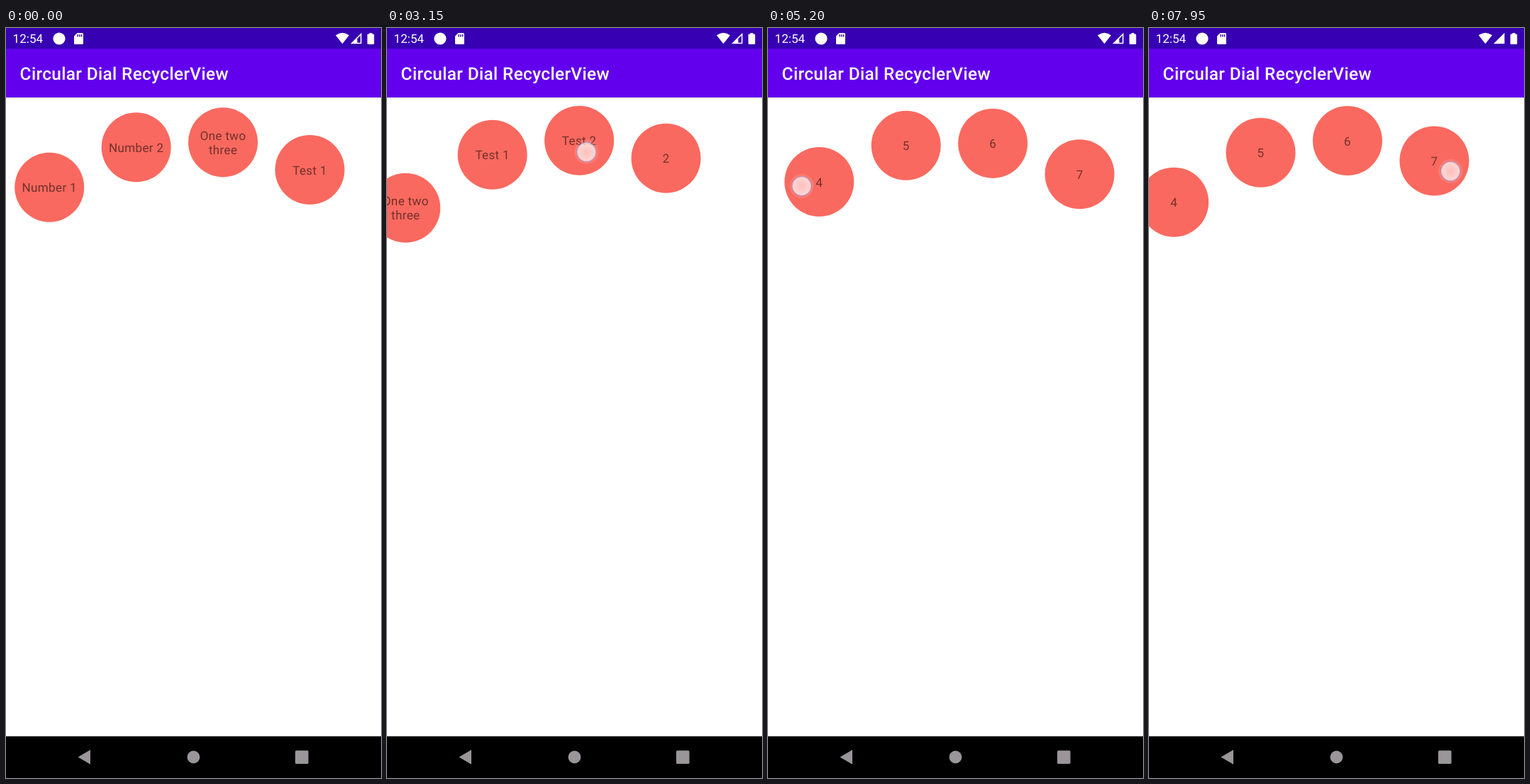
An HTML page that plays this animation: 529x1058 px, repeating every 8 s.

```html
<!DOCTYPE html>
<html lang="en">
<head>
<meta charset="utf-8">
<title>Circular dial list</title>
<style>
  html, body { margin: 0; width: 100%; height: 100%; overflow: hidden; background: #fff; }
  svg { display: block; width: 100vw; height: 100vh; }
  text { font-family: Roboto, sans-serif; fill: #fff; text-rendering: geometricPrecision; }
  .clock { font-size: 17.14px; }
  .title { font-size: 24.49px; font-weight: 500; letter-spacing: .0125em; }
  .item circle { fill: #fa695f; }
  .item text { font-size: 17.14px; letter-spacing: .0178em; text-anchor: middle; fill: #000; fill-opacity: .54; }
</style>
</head>
<body>
<svg viewBox="0 0 529 1058">
  <defs>
    <linearGradient id="shade" x2="0" y2="1">
      <stop offset="0" stop-color="#000" stop-opacity=".12"/>
      <stop offset="1" stop-color="#000" stop-opacity="0"/>
    </linearGradient>
    <radialGradient id="glass">
      <stop offset="0" stop-color="#fff" stop-opacity=".52"/>
      <stop offset="1" stop-color="#fff" stop-opacity=".7"/>
    </radialGradient>
  </defs>

  <rect width="529" height="1058" fill="#fff"/>
  <g id="items"></g>

  <rect y="98" width="529" height="3" fill="url(#shade)"/>
  <rect width="529" height="97.96" fill="#6200ee"/>
  <rect width="529" height="29.39" fill="#3700b3"/>
  <text class="title" x="19.6" y="73.2">Circular Dial RecyclerView</text>
  <text class="clock" x="9.6" y="21">12:54</text>

  <g fill="#fff">
    <circle cx="75" cy="15" r="8.6"/>
    <path d="M100.5 7H107.5Q109 7 109 8.5V21.5Q109 23 107.5 23H97.5Q96 23 96 21.5V11.5Z"/>
    <path d="M465 10.3Q474.5 3 484 10.3L474.5 22.3Z"/>
    <path d="M501.5 6.8V22.3H486Z"/>
    <path d="M512.6 7H516.4V8.6H518Q519.3 8.6 519.3 9.9V21.7Q519.3 23 518 23H511Q509.7 23 509.7 21.7V9.9Q509.7 8.6 511 8.6H512.6Z"/>
  </g>
  <path id="weak" d="M495.5 15.2L500 10.6V20.8H495.5Z" fill="#3700b3"/>
  <path d="M101.2 9V12.4M103.9 9V12.4M106.6 9V12.4" stroke="#3700b3" stroke-width="1.4"/>

  <rect y="999.2" width="529" height="58.8" fill="#000"/>
  <g fill="#999599">
    <path d="M101.5 1028.5L119 1018.3V1038.7Z"/>
    <circle cx="264.5" cy="1028.5" r="8.9"/>
    <rect x="408" y="1019.3" width="18.6" height="18.6" rx="1.5"/>
  </g>

  <g id="touch">
    <circle r="17" fill="#fff" fill-opacity=".12"/>
    <circle r="13.5" fill="url(#glass)" stroke="#9088c8" stroke-opacity=".4" stroke-width="2"/>
  </g>
</svg>
<script>
const LOOP = 8000, PITCH = 122.45, RADIUS = 49, SHOWN = 4;
const DIAL = { x: 264.5, top: 158.7, r: 346 };
const FULL_SIGNAL = 5600;
const RAMP = .2, LIFT = .83, LEAD = 1.03;

const LABELS = ["Number 1", "Number 2", "One two|three", "Test 1", "Test 2"];
for (let n = 2; n < 12; n++) LABELS.push(String(n));

// Each drag scrolls by dist; the finger starts at x, y and drifts down by drop
const DRAGS = [
  { start: 1375, time: 1425, dist: 241.5, x: 298.4, y: 183, drop: 43 },
  { start: 2850, time: 1300, dist: 233.4, x: 320.9, y: 172, drop: 18.6 },
  { start: 4250, time: 1250, dist: 449.4, x: 429.9, y: 190, drop: 40 },
  { start: 5550, time: 1250, dist: 282.9, x: 350.7, y: 192, drop: 47.4 },
  { start: 7050, time: 1150, dist: -379.2, x: 91.7, y: 226, drop: -28 }
];

// Speeds up, runs evenly, slows down
function ease(u) {
  const end = w => w * w / (2 * RAMP * (1 - RAMP));
  if (u < RAMP) return end(u);
  if (u > 1 - RAMP) return 1 - end(1 - u);
  return (u - RAMP / 2) / (1 - RAMP);
}

const progress = (drag, t) => Math.min(1, Math.max(0, (t - drag.start) / drag.time));

function make(tag, parent, attrs = {}) {
  const el = document.createElementNS("http://www.w3.org/2000/svg", tag);
  for (const name in attrs) el.setAttribute(name, attrs[name]);
  return parent.appendChild(el);
}

const list = document.getElementById("items");
const touch = document.getElementById("touch");
const weak = document.getElementById("weak");

const items = LABELS.map(label => {
  const g = make("g", list, { class: "item" });
  make("circle", g, { r: RADIUS });
  const lines = label.split("|");
  lines.forEach((line, i) => {
    const y = 6.6 + 20.1 * (i - (lines.length - 1) / 2);
    make("text", g, { x: 0, y }).textContent = line;
  });
  return g;
});

const show = (el, on) => { el.style.display = on ? "" : "none"; };
const place = (el, x, y) =>
  el.setAttribute("transform", `translate(${x.toFixed(2)} ${y.toFixed(2)})`);

const dialY = x => DIAL.top + DIAL.r - Math.sqrt(Math.max(0, DIAL.r ** 2 - (x - DIAL.x) ** 2));

function draw(t) {
  const offset = DRAGS.reduce((sum, d) => sum + d.dist * ease(progress(d, t)), 0);
  const first = Math.max(0, Math.ceil((offset - RADIUS) / PITCH - .5));
  items.forEach((el, i) => {
    const x = PITCH * (i + .5) - offset;
    show(el, i >= first && i < first + SHOWN);
    place(el, x, dialY(x));
  });

  const drag = DRAGS.find(d => progress(d, t) > 0 && progress(d, t) < LIFT);
  show(touch, drag);
  if (drag) {
    const e = ease(progress(drag, t));
    place(touch, drag.x - LEAD * drag.dist * e, drag.y + drag.drop * e);
  }
  show(weak, t < FULL_SIGNAL);
}

const start = performance.now();
function tick() {
  draw((performance.now() - start) % LOOP);
  requestAnimationFrame(tick);
}
tick();
</script>
</body>
</html>
```
